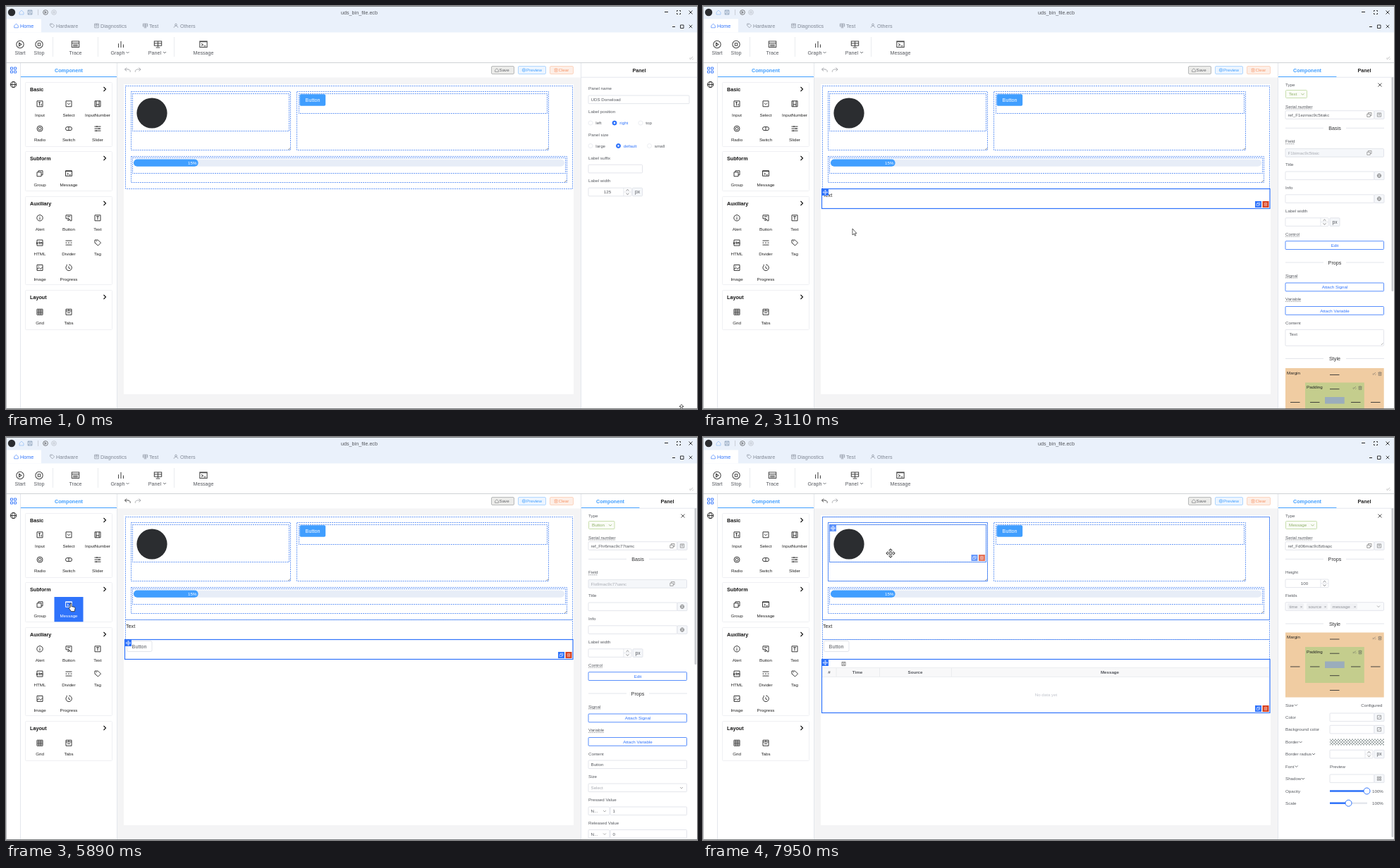
Animation of 980 by 572 pixels, one loop 8 s. Source, as an HTML page:

```html
<!DOCTYPE html>
<html lang="en">
<head>
<meta charset="utf-8">
<title>Panel designer</title>
<style>
html, body { margin: 0; width: 100%; height: 100%; overflow: hidden; background: #fff; }
svg { display: block; font-family: "Liberation Sans", Arial, sans-serif; }
</style>
</head>
<body>
<svg id="stage" width="980" height="572" viewBox="0 0 980 572"></svg>
<script>
const LOOP = 8000, BLUE = '#2f73fb', SKY = '#409eff', GRAY = '#55585e', LINE = '#dcdfe6', INK = '#222';

// Drawing helpers: every one returns SVG markup.
const rect = (x, y, w, h, fill = 'none', stroke = 'none', r = 0, width = .8, dash = 'none') =>
  `<rect x="${x}" y="${y}" width="${w}" height="${h}" rx="${r}" fill="${fill}" stroke="${stroke}" stroke-width="${width}" stroke-dasharray="${dash}"/>`;
const path = (d, stroke = GRAY, width = .9, fill = 'none', dash = 'none') =>
  `<path d="${d}" stroke="${stroke}" stroke-width="${width}" fill="${fill}" stroke-dasharray="${dash}"/>`;
const at = (x, y, content, sx = 1, sy = sx) => `<g transform="translate(${x} ${y}) scale(${sx} ${sy})">${content}</g>`;
const dot = (x, y, r, fill, stroke = 'none') => `<circle cx="${x}" cy="${y}" r="${r}" fill="${fill}" stroke="${stroke}"/>`;
const text = (x, y, s, fill = GRAY, size = 6.2, anchor = 'start', weight = 400) =>
  `<text x="${x}" y="${y + size * .36}" fill="${fill}" font-size="${size}" text-anchor="${anchor}" font-weight="${weight}">${s}</text>`;
const mid = (x, y, s, fill, size, weight) => text(x, y, s, fill, size, 'middle', weight);
const icon = (name, x, y, color = INK, scale = 1) => at(x, y, path(icons[name], color), scale);
const chevron = (x, y, color = GRAY) => at(x, y, path('M-2-1l2 2 2-2', color, .8));
const ring = r => `M${-r} 0a${r} ${r} 0 1 0 ${2 * r} 0a${r} ${r} 0 1 0 ${-2 * r} 0`;

const square = 'M-4-4h8v8h-8z', screen = 'M-4.5-4h9v7.5h-9z';
const icons = {
  Input: square + 'M-2-2h3M-.5-2v4.5M2 0v2.5', Select: square + 'M-2-1l2 2 2-2',
  InputNumber: square + 'M-2-4v8M2-4v8M-2 1h4', Radio: ring(4) + ring(2),
  Switch: 'M-2-2.5h4a2.5 2.5 0 0 1 0 5h-4a2.5 2.5 0 0 1 0-5M0-2.5v5',
  Slider: 'M-4.5-3h9M-4.5 0h9M-4.5 3h9M-1-4v2M2-1v2M-2 2v2',
  Group: 'M-4-2h6v6h-6zM-2-2v-2h6v6h-2', Message: screen + 'M-4.5-3.3h9M-2.5-1l2 1.5-2 1.5M.5 2h2.5',
  Alert: ring(4.2) + 'M0-2.2v1M0-.5v3', Button: 'M-4 1v-5h8v5M-4 1h2M-2-2h4M-1 4v-4l3 3h-2zM4 1v3h-2',
  Text: square + 'M-2-2h4M0-2v4.5',
  HTML: 'M-4-1v-3h8v3M-4 2v2h8v-2M-4.5-1v3M-3-1v3M-4.5.5h1.5M-1.7-1h2M-.7-1v3M1 2v-3l1 1 1-1v3M4.2-1v3',
  Divider: 'M-4.5-3h9M-4.5 0h2M-1 0h2M2.5 0h2M-4.5 3h9', Tag: 'M-4-4h4.5l4 4-4 4-4.5-4zM-2-2.2h1',
  Image: square + 'M-4 2l3-2 2 2 3-3M-2-2h1', Progress: 'M-2.8-3a4.2 4.2 0 1 0 3-1.2M-2.8-3v-1.5M0-2v2.5l2 1',
  Grid: square + 'M-4-1.3h8M-4 1.3h8M-1.3-4v8M1.3-4v8', Tabs: square + 'M-4-1.5h8M0-4v2.5M-2 1h4',
  Globe: ring(4.2) + 'M-4.2 0h8.4M0-4.2c-3 3-3 5.4 0 8.4c3-3 3-5.4 0-8.4',
  Copy: 'M-4-1.5h5.5v5h-5.5zM-2-1.5v-2.3h5.8v5h-2.3', Edit: square + 'M-2 2l4.5-4.5',
  Link: 'M-3 3l6-6M-4 1l2-2M2 3l2-2', Trash: 'M-4-3h8M-3-3v7h6v-7M-1-1v3M1-1v3M-1-4h2',
  Home: 'M-4 0l4-4 4 4v4h-8z', Save: square + 'M-2-4v2.5h4v-2.5M-2 4v-3h4v3',
  Play: ring(4.5) + 'M-1.3-2l3 2-3 2z', Stop: ring(4.5) + 'M-1.5-1.5h3v3h-3z',
  Trace: screen + 'M-4.5-1.5h9M-3 .5h6M-3 2h6', Graph: 'M-3-1v5M0-4v8M3 0v4',
  Panel: 'M-4.5-4h9v5.5h-9zM-4.5-1.3h9M0-4v7M-2.5 4h5', Apps: 'M-4-4h3v3h-3zM1-4h3v3h-3zM-4 1h3v3h-3zM1 1h3v3h-3z',
  Move: 'M-4 0h8M0-4v8M-2.5-1.5l-1.5 1.5 1.5 1.5M2.5-1.5l1.5 1.5-1.5 1.5M-1.5-2.5l1.5-1.5 1.5 1.5M-1.5 2.5l1.5 1.5 1.5-1.5',
  Users: 'M-2-2a2 2 0 1 0 4 0a2 2 0 1 0-4 0M-4 4c0-5 8-5 8 0', Undo: 'M4 3c1-4-4-5-8-4M-1.5-4l-3 3 3 2.5',
  Close: 'M-2.5-2.5l5 5m0-5l-5 5'
};

// Component palette: title, box top, box height, first tile top, tiles
const palette = [
  ['Basic', 108.5, 91, 128, ['Input', 'Select', 'InputNumber', 'Radio', 'Switch', 'Slider']],
  ['Subform', 206.5, 56, 227, ['Group', 'Message']],
  ['Auxiliary', 270.5, 125, 290, ['Alert', 'Button', 'Text', 'HTML', 'Divider', 'Tag', 'Image', 'Progress']],
  ['Layout', 403.5, 56, 423.5, ['Grid', 'Tabs']]
];
const TILE_W = 41, TILE_H = 35.3;
const tiles = palette.flatMap(([, , , top, names]) => names.map((name, i) =>
  ({ name, x: 27.5 + i % 3 * TILE_W, y: top + Math.floor(i / 3) * TILE_H })));
const tileFace = ({ name, x, y }, color = INK) =>
  icon(name, x + 20.5, y + 10.8, color) + mid(x + 20.5, y + 26.7, name, color);

function chrome() {
  const muted = '#808895';
  let s = rect(0, 0, 980, 572, '#fff') + rect(0, 0, 980, 37.5, '#eaf1fb') + rect(1, 18.5, 49, 19, '#fff');
  s += dot(8, 9, 5.2, '#2b2d30') + mid(501, 9, 'uds_bin_file.ecb', GRAY, 7.2);
  for (const [name, x, color] of [['Home', 22, '#8fbcf5'], ['Save', 34, '#7d92ad'], ['Play', 56, '#444'], ['Stop', 68, '#b5b9c0']])
    s += icon(name, x, 9, color, .75);
  s += path('M45.5 5v8', '#c8ccd4') + path('M934 8.5h5M945 29.5h4', INK, 1) + icon('Close', 971, 9) + icon('Close', 971, 29, INK, .9);
  s += path('M951.5 8v-1.5h1.5M955 6.5h1.5v1.5M956.5 10v1.5h-1.5M953 11.5h-1.5v-1.5M956.5 27h4.5v4.5h-4.5z', INK);
  for (const [label, name, x, tx, color] of [['Home', 'Home', 14.5, 20, BLUE], ['Hardware', 'Tag', 65.5, 71, muted],
    ['Diagnostics', 'Tabs', 128.5, 134, muted], ['Test', 'Panel', 197.5, 203, muted], ['Others', 'Users', 241, 247, muted]])
    s += icon(name, x, 28, color, .7) + text(tx, 28, label, color, 7.2);
  for (const [label, name, x, isMenu] of [['Start', 'Play', 20], ['Stop', 'Stop', 47], ['Trace', 'Trace', 98.5],
    ['Graph', 'Graph', 163, true], ['Panel', 'Panel', 215.5, true], ['Message', 'Message', 280]]) {
    const tx = isMenu ? x - 4.5 : x;
    s += icon(name, x, 54.5, '#444', 1.15) + mid(tx, 66, label, GRAY, 7.2) + (isMenu ? chevron(tx + 14, 66) : '');
  }
  s += path('M66.5 44v28M130.5 44v28M238.5 44v28', '#e8eaee') + icon('Link', 972, 74, '#999', .7);
  s += path('M0 80.5h980', '#cfd2d6', 1) + path('M20.5 81v490M157.5 81v490', '#e4e7ed', 1);
  s += icon('Apps', 10.5, 91, BLUE) + icon('Globe', 10.5, 111.5);
  s += mid(89, 91, 'Component', SKY, 7.2, 700) + path('M21 100.5h136', SKY, 1.1);
  for (const [title, y, h] of palette)
    s += rect(27.5, y, 123, h, '#fff', '#ebedf0', 1) + text(34, y + 9.8, title, '#111', 7.2, 'start', 700)
      + at(140, y + 9.5, path('M-1.5-3l3 3-3 3', '#111', 1.1));
  return s + tiles.map(t => tileFace(t)).join('') + canvas();
}

// Design area
const OUTLINE = '#5088f4';
const dashed = (x, y, w, h) => rect(x, y, w, h, 'none', OUTLINE, 0, .85, '2 1.1');
const solid = (x, y, w, h) => rect(x, y, w, h, 'none', OUTLINE, 0, .9);
const group = [169.5, 113.5, 634, 146];
const columns = [
  { cell: [177.5, 121.5, 226, 83], item: [179.5, 124.5, 222, 53] },
  { cell: [412.5, 121.5, 357, 83], item: [415.5, 124.5, 352, 28] },
  { cell: [177.5, 213.5, 618, 37], item: [179.5, 215.5, 614, 22] }
];
function canvas() {
  let s = rect(158, 101.5, 657, 470, '#f4f4f5') + rect(167, 111, 638, 440, '#fff');
  for (const [label, x, w, tx, fill, edge, color, name] of [
    ['Save', 688.5, 32, 699.5, '#ebebe9', '#a9abad', '#63666a', 'Home'],
    ['Preview', 726.5, 39, 738, '#ecf5ff', '#a0cfff', SKY, 'Radio'],
    ['Clear', 771.5, 33, 783.5, '#fdeee6', '#fbcdb4', '#f79466', 'Trash']])
    s += rect(x, 85.5, w, 11, fill, edge, 1.5) + icon(name, tx - 3.5, 91, color, .6) + text(tx, 91, label, color);
  s += at(187, 91, path(icons.Undo, '#8d9096', .8), -.9, .9) + dashed(...group);
  for (const { cell, item } of columns) {
    const [x, y, w, h] = cell;
    s += dashed(...cell) + dashed(...item) + path(`M${x + w - 3} ${y + h - .5}l2.5-2.5`, '#444', .7);
  }
  return s + dot(207, 152, 21.6, '#2b2d30')
    + rect(416.5, 125.3, 36.7, 16.5, SKY, 'none', 2) + mid(435, 133.6, 'Button', '#fff', 7.2)
    + rect(181, 217.5, 611, 10.3, '#e7edf7', 'none', 5.1) + rect(181, 217.5, 91.6, 10.3, SKY, 'none', 5.1)
    + text(270.5, 222.7, '15%', '#fff', 6.2, 'end');
}

function handles(x, y, w, h) {
  const right = x + w, bottom = y + h;
  return rect(x, y, 9.5, 9.5, BLUE) + icon('Move', x + 4.9, y + 4.9, '#fff', .8)
    + rect(right - 21, bottom - 10.5, 9, 9, BLUE) + icon('Copy', right - 16.5, bottom - 6, '#fff', .6)
    + rect(right - 10.5, bottom - 10.5, 9, 9, '#d8401f') + icon('Trash', right - 6, bottom - 6, '#fff', .55);
}
const frame = (y, h, selected) => selected
  ? rect(168.5, y, 635.5, h, 'none', BLUE, 0, 1.2) + handles(168.5, y, 635.5, h)
  : dashed(169.5, y, 634, h);

// Property panel
const label = (y, s, x = 826) => text(x, y, s);
const hint = (y, s, w) => label(y, s) + path(`M826 ${y + 3.7}h${w}`, GRAY, .6, 'none', '1 .6');
const field = (x, y, w, value = '', fill = '#fff', color = GRAY, h = 11.6) =>
  rect(x, y, w, h, fill, LINE, 1) + text(x + 3.5, y + 6, value, color);
const cap = (x, y) => rect(x, y, 14, 11.6, '#f5f7fa', LINE, 1);
const addon = (y, name) => cap(952, y) + icon(name, 959, y + 5.8, '#666', .65);
const unit = (x, y) => cap(x, y) + mid(x + 7, y + 5.7, 'px', GRAY, 6.8);
const number = (x, y, value = '') => field(x, y, 61) + mid(x + 27, y + 6, value)
  + path(`M${x + 50} ${y}v11.6M${x + 50} ${y + 5.8}h11`, LINE, .7)
  + path(`M${x + 53.5} ${y + 4}l2-1.7 2 1.7M${x + 53.5} ${y + 7.7}l2 1.7 2-1.7`, GRAY, .7);
const divider = (y, s) => path(`M826 ${y}h54M912 ${y}h54`, LINE, .8) + mid(896, y, s, '#303133', 7.2);
const action = (y, s) => rect(826, y, 139.5, 11.8, '#fff', BLUE, 1) + mid(896, y + 5.9, s, BLUE);
const radios = (y, list) => list.map(([s, x, on]) => dot(x, y, 3, on ? BLUE : '#fff', on ? BLUE : '#eceef2')
  + (on ? dot(x, y, 1.2, '#fff') : '') + text(x + 7.3, y, s, on ? BLUE : GRAY)).join('');

function componentHead(type, ref, tagWidth, thumb) {
  return rect(815, 81, 165, 491, '#fff') + mid(857, 91, 'Component', SKY, 7.2, 700) + mid(938, 91, 'Panel', INK, 7.2, 700)
    + path('M816 100.5h82.5', SKY, 1.1) + path('M898.5 101.2h81.5', '#e4e7ed', 1) + rect(976.5, 101, 2.7, thumb, '#c9cbcf', 'none', 1.3)
    + label(112, 'Type') + icon('Close', 960, 112, '#444') + rect(826.5, 119.5, tagWidth, 11, '#fafcf6', '#bcd79b', 1)
    + text(831, 125.2, type, '#8fb069') + chevron(820.5 + tagWidth, 125.2, '#8fb069')
    + hint(142.3, 'Serial number', 38) + field(826, 148.7, 126, ref) + icon('Copy', 945, 154.5, '#777', .8) + addon(148.7, 'Text');
}
const basics = id => divider(173.3, 'Basis') + hint(192, 'Field', 13) + field(826, 202.6, 139.5, id, '#f5f7fa', '#a8abb2')
  + icon('Copy', 945, 208.5, '#888', .8) + label(225, 'Title') + field(826, 235, 126) + addon(235, 'Globe')
  + label(258, 'Info') + field(826, 267.8, 126) + addon(267.8, 'Globe')
  + label(290.5, 'Label width') + number(826, 300.8) + unit(889, 300.8) + hint(323.5, 'Control', 20) + action(333.7, 'Edit')
  + divider(364, 'Props') + hint(382.3, 'Signal', 17) + action(393, 'Attach Signal')
  + hint(415.7, 'Variable', 22) + action(426.5, 'Attach Variable') + label(449.3, 'Content');
const boxModel = y => at(0, y, rect(826, 0, 139.7, 92, '#f0cca2') + rect(854, 20.5, 83.8, 51, '#c4cd8d') + rect(882, 41, 27.7, 9.5, '#9badbc')
  + text(828, 6.7, 'Margin', INK) + text(856, 27, 'Padding', INK)
  + [9.5, 29.7, 61.2, 82].map(v => path(`M889 ${v}h13.5`, '#333')).join('')
  + [833, 861, 919, 947].map(v => path(`M${v} 48.5h13.5`, '#333')).join('')
  + [[952, 8], [924, 28]].map(([x, v]) => icon('Link', x, v, '#555', .6) + icon('Trash', x + 8, v, '#555', .6)).join(''));
const valueRow = (y, name, value) => label(y, name) + field(826, y + 10, 30, 'N...') + chevron(849, y + 16, '#999')
  + field(857, y + 10, 108.5, value);
const slider = (y, name, x) => label(y, name) + path(`M889 ${y}h53`, '#e4e7ed', 2.5) + path(`M889 ${y}H${x}`, BLUE, 2.5)
  + dot(x, y, 4.5, '#fff', BLUE) + text(949, y, '100%');
const fieldTag = ([s, x, w]) => rect(x, 236.2, w, 8.6, '#f0f1f4', 'none', 1) + text(x + 2.5, 240.4, s, '#909399')
  + mid(x + w - 3.5, 240.4, '×', '#909399');
const styleFold = ([s, y, x]) => label(y, s) + chevron(x, y);

const panels = {
  Panel: rect(815, 81, 165, 491, '#fff') + mid(898, 91, 'Panel', INK, 7.2, 700) + path('M815 101.2h165', '#e4e7ed', 1)
    + label(117, 'Panel name') + field(826, 127, 143, 'UDS Donwload')
    + label(150, 'Label position') + radios(166, [['left', 829], ['right', 863, true], ['top', 900]])
    + label(182.5, 'Panel size') + radios(198.5, [['large', 829], ['default', 868.5, true], ['small', 912.5]])
    + label(215.5, 'Label suffix') + field(826, 225.3, 76.5)
    + label(248, 'Label width') + number(826, 258.2, '125') + unit(888.5, 258.2),
  Text: componentHead('Text', 'ref_F1ezmac9c5itakc', 30, 304) + basics('F1bimac9c5itaic')
    + field(826, 459.3, 139.5, '', '#fff', GRAY, 23) + text(831.5, 466, 'Text') + path('M962 481l2.5-2.5', '#777', .6)
    + divider(500.5, 'Style') + boxModel(514),
  Button: componentHead('Button', 'ref_Fhr6mac9c77tamc', 36.5, 222) + basics('Flo9mac9c77uanc')
    + field(826, 459, 139.5, 'Button') + label(482, 'Size') + field(826, 492, 139.5, 'Select', '#fff', '#a8abb2') + chevron(958, 498, '#999')
    + valueRow(515, 'Pressed Value', '1') + valueRow(547.5, 'Released Value', '0'),
  Message: componentHead('Message', 'ref_Fd06mac9c8zbapc', 44, 467) + divider(173.3, 'Props')
    + label(192, 'Height') + number(826, 202, '100') + label(225, 'Fields') + field(826, 234.7, 139.5, '', '#fafbfc')
    + [['time', 829, 23], ['source', 856, 30], ['message', 890, 38]].map(fieldTag).join('') + chevron(958, 240.5, '#999')
    + divider(265, 'Style') + boxModel(277.5)
    + [['Size', 380.5, 841], ['Border', 433, 847.5], ['Border radius', 450, 866], ['Font', 467.5, 841.5], ['Shadow', 485, 851]].map(styleFold).join('')
    + text(963.5, 380.5, 'Configured', GRAY, 6.2, 'end') + label(398, 'Color') + label(415, 'Background color') + label(467.5, 'Preview', 889)
    + [[392, 'Edit'], [409.3, 'Edit'], [479, 'Apps']].map(([y, name]) => field(889, y, 63) + addon(y, name)).join('')
    + rect(889, 428.5, 77, 9, 'url(#checker)') + number(889, 444.3) + unit(952, 444.3)
    + slider(502.5, 'Opacity', 941.5) + slider(519.7, 'Scale', 915.5)
};

// Story: press a tile, lift its ghost, reach the canvas, let go, see the panel update.
const drags = {
  Text: { press: 2150, lift: 2230, over: 2400, release: 2600, drop: 2640 },
  Tag: { press: 3850, lift: Infinity, over: Infinity, release: Infinity, drop: 4300 },
  Button: { press: 4330, lift: 4420, over: 4640, release: 5060, drop: 5270 },
  Message: { press: 5890, lift: 5960, over: 6140, release: 7390, drop: 7470 }
};
const SWAP = 6800; // the message slot moves below the button
const cursorPath = [
  [0, 958, 571], [70, 958, 571], [820, 600, 236], [1590, 300, 190], [1720, 300, 190], [2070, 138, 295], [2150, 132, 300],
  [2490, 214, 274], [2640, 214, 274], [3060, 212, 316], [3410, 212, 316], [3650, 160, 309], [3850, 130, 330], [4160, 109, 322],
  [4300, 92, 300], [4420, 92, 302], [4860, 222, 306], [5060, 222, 306], [5200, 141, 257], [5450, 93, 237], [5890, 92, 236],
  [6290, 224, 323], [6510, 224, 323], [7130, 226, 331], [7390, 226, 331], [7900, 266, 165], [LOOP, 266, 165]
];
function cursorAt(t) {
  const i = cursorPath.findIndex(key => key[0] > t), [t0, x0, y0] = cursorPath[i - 1], [t1, x1, y1] = cursorPath[i];
  const p = (t - t0) / (t1 - t0), eased = p * p * (3 - 2 * p);
  return [x0 + (x1 - x0) * eased, y0 + (y1 - y0) * eased];
}
const inside = (px, py, [x, y, w, h]) => px >= x && px < x + w && py >= y && py < y + h;

const pointers = {
  arrow: path('M0 0v9l2-1.8 1.5 3 1.3-.6-1.4-2.9h2.6z', INK, .7, '#fff'),
  hand: path('M-.9 6v-5.2a.9.9 0 0 1 1.8 0v3.7l4.2.9q1.3.5.9 2.2l-.8 4h-4.7l-3.1-4.2q-.8-1.5.6-1.2z', INK, .8, '#fff'),
  move: at(0, 0, path(icons.Move, '#333', 2.2) + path(icons.Move, '#fff', .8), 1.2),
  resize: path('M0-5.5l3 3.2h-2v4.6h2l-3 3.2-3-3.2h2v-4.6h-2z', INK, .8, '#fff')
};

function placeholder(name, y) {
  const x = name === 'Message' ? 482 : 486;
  return rect(169.5, y, 634, 16, '#f5f5f5', INK, 0, .9, '2 1') + icon(name, x - 7.5, y + 8) + text(x, y + 8, name, INK);
}
function messageTable() {
  return rect(169, 316, 634.5, 75.5, '#fff') + rect(169, 328, 634.5, 12, '#f8f8f9') + icon('Save', 199.5, 322, '#555', .65)
    + path('M169 327.5h634M169 340.5h634M189 328v12M250.5 328v12M352.5 328v12', '#e8eaec', .8)
    + [['#', 179], ['Time', 219], ['Source', 301], ['Message', 577]].map(([s, x]) => mid(x, 334, s, GRAY, 6.2, 700)).join('')
    + mid(486.5, 366, 'No data yet', '#c0c4cc') + frame(315.5, 76, true);
}
function hoverOutlines(x, y) {
  let s = solid(...group);
  for (const { cell, item } of columns) {
    if (inside(x, y, cell)) s += solid(...cell);
    if (inside(x, y, item)) s += solid(...item) + `<g opacity=".75">${handles(...item)}</g>`;
  }
  return s;
}

function scene(t) {
  const [x, y] = cursorAt(t);
  const active = Object.keys(drags).find(name => t >= drags[name].press && t < drags[name].drop);
  const drag = drags[active];
  const has = name => t >= drags[name].drop;
  const selected = ['Message', 'Button', 'Text'].find(has) || 'Panel';
  const hot = tiles.find(tile => inside(x, y, [tile.x, tile.y, TILE_W, TILE_H]));
  const lit = active ? tiles.find(tile => tile.name === active) : hot;
  const hovering = !active && t > 70 && inside(x, y, group);
  const dragOver = active && t >= drag.over;
  const swapped = active === 'Message' && t >= SWAP;
  const pushed = dragOver && active === 'Message' && !swapped ? 21 : 0;

  let s = icon('Undo', 172.5, 91, has('Button') ? INK : '#8d9096', .9);
  if (lit) s += rect(lit.x, lit.y, TILE_W, TILE_H, active ? BLUE : '#e6eefd') + tileFace(lit, active ? '#fff' : INK);
  if (has('Text')) s += text(170, 268.5, 'Text', INK, 7.2) + frame(259.5, 28, selected === 'Text');
  if (has('Button')) s += rect(171.5, 289.5 + pushed, 35.5, 15, '#fff', LINE, 2) + mid(189, 297 + pushed, 'Button', GRAY, 7.2)
    + frame(287.5 + pushed, 28, selected === 'Button');
  if (has('Message')) s += messageTable();
  if (hovering) s += hoverOutlines(x, y);
  if (dragOver) s += placeholder(active, active === 'Text' ? 261.5 : swapped ? 318.5 : 289.5)
    + rect(168, 547.8, 636, 2.4, '#cfd1d4', 'none', 1.2);
  s += panels[selected] + path('M815.5 81v490', '#e4e7ed', 1)
    + path('M0 .5h980M0 571.5h980', '#5a5d60', .8) + path('M.5 0v572', '#a6a9ad', .8);

  if (active && t >= drag.lift && t < drag.release) {
    const ghost = { name: active, x: x - 23.5, y: y - 9 };
    s += `<g opacity=".75">${rect(ghost.x, ghost.y, TILE_W, TILE_H, BLUE)}${tileFace(ghost, '#fff')}</g>`;
  }
  const pointer = t < 70 ? 'resize' : active || hot ? 'hand' : hovering ? 'move' : 'arrow';
  return s + at(x, y, pointers[pointer]);
}

const stage = document.getElementById('stage');
stage.innerHTML = `<defs><pattern id="checker" width="4" height="4" patternUnits="userSpaceOnUse">
  ${rect(0, 0, 4, 4, '#fff')}${rect(0, 0, 2, 2, '#a4acac')}${rect(2, 2, 2, 2, '#a4acac')}</pattern></defs>${chrome()}<g id="live"></g>`;
const live = document.getElementById('live');
const start = performance.now();
function draw() {
  live.innerHTML = scene((performance.now() - start) % LOOP);
  requestAnimationFrame(draw);
}
draw();
</script>
</body>
</html>
```
